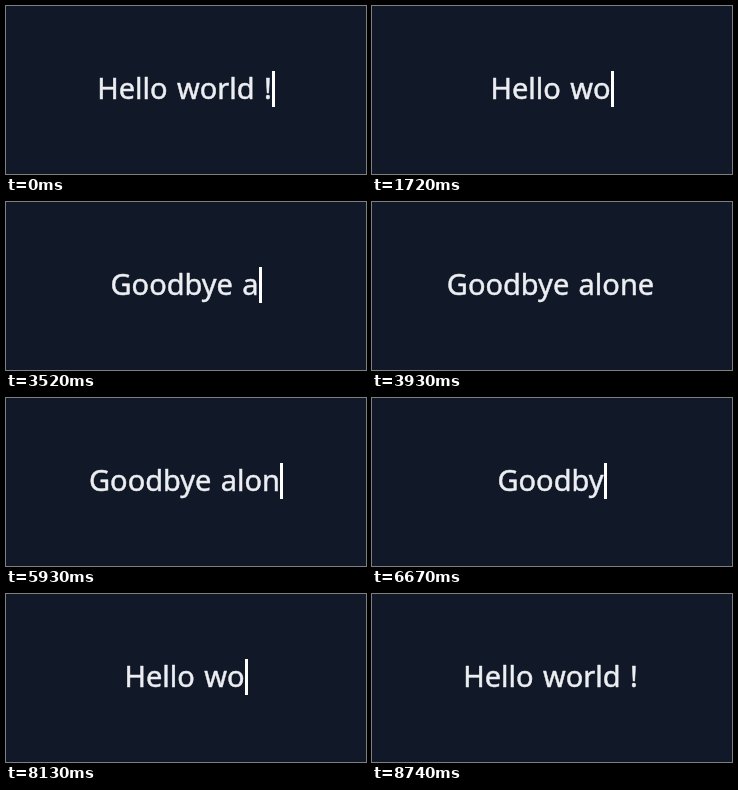
Recreate the animation shown at these times as an HTML page with a canvas. Size 360x168 px, loop 9270 ms.

```html
<!DOCTYPE html>
<html lang="en">
<head>
<meta charset="utf-8">
<title>Typewriter</title>
<style>
  html, body { margin: 0; width: 100%; height: 100%; overflow: hidden; background: #111827; }
  canvas { display: block; }
</style>
</head>
<body>
<canvas id="stage" width="360" height="168"></canvas>
<script>
const ctx = document.getElementById('stage').getContext('2d', { alpha: false });
const W = 360, H = 168, LOOP = 9270;
const CARET = { width: 3, top: 65, height: 36 };
const BASELINE = 93;

// All times in ms. Each swap erases one phrase, then types the other.
const HELLO = 'Hello world !', GOODBYE = 'Goodbye alone';
const FIRST_SWAP = 1190, SECOND_SWAP = 5930;
const ERASE_STEP = 121, TYPE_DELAY = 1460, TYPE_STEP = 104;
const BLINK = 600, HIDES = [400, 3930, 5130, 8740];

function swapText(from, to, age) {
  if (age < 0) return from;
  const typing = age - TYPE_DELAY;
  if (typing >= 0) return to.slice(0, Math.floor(typing / TYPE_STEP) + 1);
  const erased = Math.floor(age / ERASE_STEP) + 1;
  return from.slice(0, Math.max(0, from.length - erased));
}

function textAt(t) {
  const text = t < SECOND_SWAP
    ? swapText(HELLO, GOODBYE, t - FIRST_SWAP)
    : swapText(GOODBYE, HELLO, t - SECOND_SWAP);
  return text.trimEnd();
}

function caretShown(t) {
  return !HIDES.some(hide => t >= hide && t < hide + BLINK);
}

function draw(t) {
  ctx.fillStyle = '#111827';
  ctx.fillRect(0, 0, W, H);

  ctx.font = '29px "Noto Sans", sans-serif';
  ctx.wordSpacing = '1.8px';
  const text = textAt(t);
  const width = ctx.measureText(text).width;
  const left = (W - width - CARET.width) / 2;

  // A thin outline gives the letters a slightly heavier weight.
  ctx.fillStyle = ctx.strokeStyle = '#eceef2';
  ctx.lineWidth = 0.5;
  ctx.lineJoin = 'round';
  ctx.fillText(text, left, BASELINE);
  ctx.strokeText(text, left, BASELINE);

  if (caretShown(t)) {
    ctx.fillStyle = '#fff';
    ctx.fillRect(Math.round(left + width), CARET.top, CARET.width, CARET.height);
  }
}

const start = performance.now();
function tick() {
  draw((performance.now() - start) % LOOP);
  requestAnimationFrame(tick);
}
tick();
</script>
</body>
</html>
```
